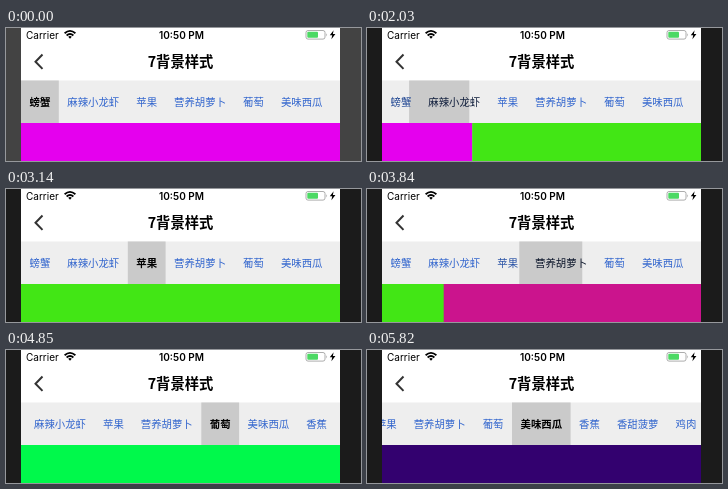
An HTML page that plays this animation: 355x133 px, repeating every 6500 ms.

```html
<!DOCTYPE html>
<html lang="zh-CN">
<meta charset="utf-8">
<style>
  html, body { margin: 0; width: 100%; height: 100%; overflow: hidden; }
  svg { display: block; width: 355px; height: 133px; }
  text { font-family: "Noto Sans CJK SC", "Noto Sans CJK", "Noto Sans", sans-serif; }
  .status text { font: 10px Inter, sans-serif; }
  .status .clock { font-weight: 600; }
  .title { font-size: 14.3px; font-weight: 600; }
  #labels { font-size: 10.4px; }
</style>
<svg viewBox="0 0 355 133">
  <rect id="desk" width="355" height="133"/>
  <svg x="15" width="319" height="133" viewBox="15 0 319 133">
    <rect x="15" width="319" height="133" fill="#fff"/>
    <g class="status">
      <text x="20" y="10.5">Carrier</text>
      <g fill="none" stroke="#000" stroke-width="1.8">
        <path d="M58.6 5.2Q64 .6 69.4 5.2M60.6 7.5Q64 4.6 67.4 7.5"/>
        <path d="M62.2 8.8Q64 7.4 65.8 8.8L64 10.8Z" fill="#000" stroke="none"/>
      </g>
      <text class="clock" x="175.5" y="10.5" text-anchor="middle">10:50 PM</text>
      <rect x="300" y="2.5" width="19" height="8.6" rx="2" fill="none" stroke="#999" stroke-width=".8"/>
      <rect x="301.3" y="3.8" width="10.7" height="6" rx="1" fill="#4cd964"/>
      <path d="M320.4 5.2q1.4 1.6 0 3.2z" fill="#999"/>
      <path d="M327.6 2.2L323.8 7.2H326.2L325.4 11.2L329.4 5.9H326.9Z"/>
    </g>
    <path d="M36.5 26.5L29.5 33.7L36.5 40.9" fill="none" stroke="#333" stroke-width="2"/>
    <text class="title" x="174.5" y="39.2" text-anchor="middle">7背景样式</text>
    <g id="pages"></g>
    <rect x="15" y="52.5" width="319" height="42.5" fill="#eee"/>
    <g id="strip">
      <rect id="marker" y="52.5" height="42.5" fill="#cacaca"/>
      <g id="labels"></g>
    </g>
  </svg>
</svg>
<script>
const LOOP = 6500, LEFT = 15, WIDTH = 319, CHAR = 10.4, PAD = 8.5;
const names = ['螃蟹', '麻辣小龙虾', '苹果', '营养胡萝卜', '葡萄', '美味西瓜', '香蕉', '香甜菠萝', '鸡肉'];
const colors = ['#e500ee', '#42e615', '#42e615', '#cb148d', '#00f94b', '#33016f'];
const blue = [48, 100, 205];

// [start, end, target]: swipes move the page position, centering moves the tab strip
const swipes = [
  [1555, 1790, .326], [1940, 2250, 1], [2520, 2660, 1.33], [2810, 3140, 2],
  [3350, 3490, 2.33], [3700, 4060, 3], [4221, 4740, 4], [5107, 5530, 5]
];
const centering = [[4050, 4350, 19.6], [4752, 5052, 73.3], [5520, 5820, 121.4]];

const $ = id => document.getElementById(id);
const mix = (a, b, k) => a + (b - a) * k;
const easeOut = k => 1 - (1 - k) ** 2.5;
const easeInOut = k => k * k * (3 - 2 * k);

function follow(moves, t, ease) {
  let value = 0;
  for (const [start, end, target] of moves) {
    if (t > start) value = mix(value, target, ease(Math.min(1, (t - start) / (end - start))));
  }
  return value;
}

function add(parent, tag, attrs) {
  const el = document.createElementNS('http://www.w3.org/2000/svg', tag);
  for (const key in attrs) el.setAttribute(key, attrs[key]);
  return parent.appendChild(el);
}

let nextX = LEFT;
const tabs = names.map(name => {
  const x = nextX, width = name.length * CHAR + 2 * PAD;
  const label = add($('labels'), 'text', { x: x + PAD, y: 77.6 });
  label.textContent = name;
  nextX += width;
  return { x, width, label };
});
colors.forEach((fill, i) =>
  add($('pages'), 'rect', { x: LEFT + i * WIDTH, y: 95, width: WIDTH + .3, height: 38, fill }));

function draw() {
  const t = performance.now() % LOOP;
  const page = follow(swipes, t, easeOut);
  const from = Math.floor(page), k = page - from;
  const a = tabs[from], b = tabs[from + 1];

  $('desk').setAttribute('fill', t < 1560 ? '#434343' : '#1b1b1b');
  $('pages').setAttribute('transform', `translate(${-page * WIDTH})`);
  $('strip').setAttribute('transform', `translate(${-follow(centering, t, easeInOut)})`);
  $('marker').setAttribute('x', mix(a.x, b.x, k));
  $('marker').setAttribute('width', mix(a.width, b.width, k));
  tabs.forEach(({ label }, i) => {
    const away = Math.min(1, Math.abs(i - page));
    label.setAttribute('fill', `rgb(${blue.map(c => c * away)})`);
    label.setAttribute('font-weight', away < .01 ? 600 : 400);
  });
  requestAnimationFrame(draw);
}
draw();
</script>
</html>
```
